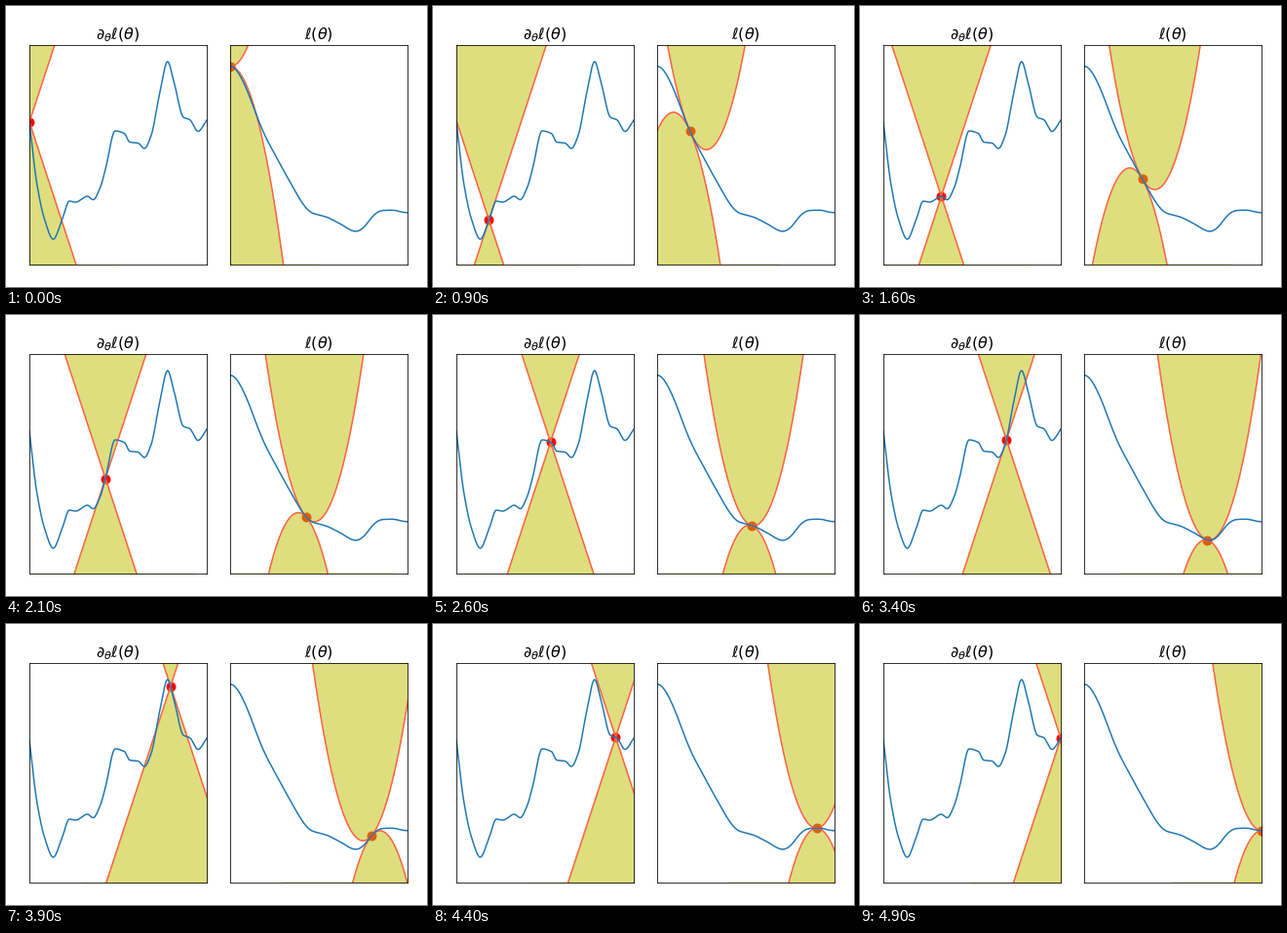
Recreate the animation shown at these times as a matplotlib script. Size 432x288 px, loop 5000 ms.

```python
import numpy as np
import matplotlib.pyplot as plt
from matplotlib.animation import FuncAnimation

W, H, DPI = 432, 288, 72
SPAN, TOP, BOTTOM = 182, 40, 265   # panel width and vertical limits, in pixels
FRAMES = 50
LIPSCHITZ = 3.05                   # slope of the gradient cone
SCALE = 0.0222                     # gradient height to loss slope
LOSS_START, LOSS_DROP = 61.8, 150

# turning points and bends of the gradient curve
KNOTS = np.array([
    (0, 119), (7.5, 181), (15.5, 218.5), (24.5, 239), (33.4, 219.5),
    (41, 200), (47.5, 201), (59.4, 195), (65.5, 198.5), (72.5, 186.5),
    (78, 167.5), (88, 128), (97.5, 130.7), (103, 139.5), (111.4, 140.5),
    (118, 146), (125, 132.5), (133.5, 90.5), (141.8, 57), (148.5, 78.5),
    (158, 114), (164.5, 116.5), (173, 128.5), (182, 117)])


def monotone_cubic(x, knots):
    """Cubic interpolation that is flat at each local extremum."""
    px, py = knots.T
    rate = np.diff(py) / np.diff(px)
    a, b = rate[:-1], rate[1:]
    inner = [2 * p * q / (p + q) if p * q > 0 else 0 for p, q in zip(a, b)]
    m = np.array([rate[0], *inner, rate[-1]])
    i = np.clip(np.searchsorted(px, x, side="right") - 1, 0, len(px) - 2)
    h = px[i + 1] - px[i]
    t = (x - px[i]) / h
    return ((1 + 2 * t) * (1 - t) ** 2 * py[i] + t * (1 - t) ** 2 * h * m[i]
            + t * t * (3 - 2 * t) * py[i + 1] + t * t * (t - 1) * h * m[i + 1])


def integrate(values, x):
    steps = (values[1:] + values[:-1]) / 2 * np.diff(x)
    return np.concatenate([[0], np.cumsum(steps)])


xs = np.linspace(0, SPAN, 729)
grad = monotone_cubic(xs, KNOTS)
zero_level = integrate(grad, xs)[-1] / SPAN - LOSS_DROP / (SCALE * SPAN)
slope = SCALE * (grad - zero_level)
loss = LOSS_START + integrate(slope, xs)

fig = plt.figure(figsize=(W / DPI, H / DPI), dpi=DPI, facecolor="white")


class Panel:
    def __init__(self, left, title, curve):
        self.curve = curve
        self.ax = fig.add_axes([left / W, 1 - BOTTOM / H, SPAN / W, (BOTTOM - TOP) / H])
        self.ax.set(xlim=(0, SPAN), ylim=(BOTTOM, TOP), xticks=[], yticks=[])
        self.ax.set_title(title, fontsize=16, pad=6)
        self.bounds = [self.ax.plot([], [], color="tomato", lw=1.5)[0] for _ in range(2)]
        self.ax.plot(xs, curve, color="C0", lw=1.5)
        self.dot = self.ax.scatter([0], [curve[0]], s=80, color="red", zorder=1)
        self.fills = []

    def show(self, x0, tilt, spread):
        y0 = np.interp(x0, xs, self.curve)
        d = np.linspace(-SPAN / 2, SPAN / 2, 201)
        for fill in self.fills:
            fill.remove()
        self.fills = []
        for line, sign, base in zip(self.bounds, (-1, 1), (-2000, BOTTOM)):
            edge = y0 + tilt * d + sign * spread(d)
            line.set_data(x0 + d, edge)
            self.fills.append(self.ax.fill_between(x0 + d, edge, base, color="y", alpha=0.5))
        self.dot.set_offsets([(x0, y0)])


gradient_panel = Panel(24, r"$\partial_\theta \ell(\theta)$", grad)
loss_panel = Panel(230.2, r"$\ell(\theta)$", loss)


def update(frame):
    x0 = SPAN * frame / (FRAMES - 1)
    gradient_panel.show(x0, 0, lambda d: LIPSCHITZ * np.abs(d))
    loss_panel.show(x0, np.interp(x0, xs, slope), lambda d: SCALE * LIPSCHITZ * d ** 2)
    return []


anim = FuncAnimation(fig, update, frames=FRAMES, interval=100, init_func=lambda: update(0),
                     repeat=True, repeat_delay=0, blit=False)
plt.show()
```
